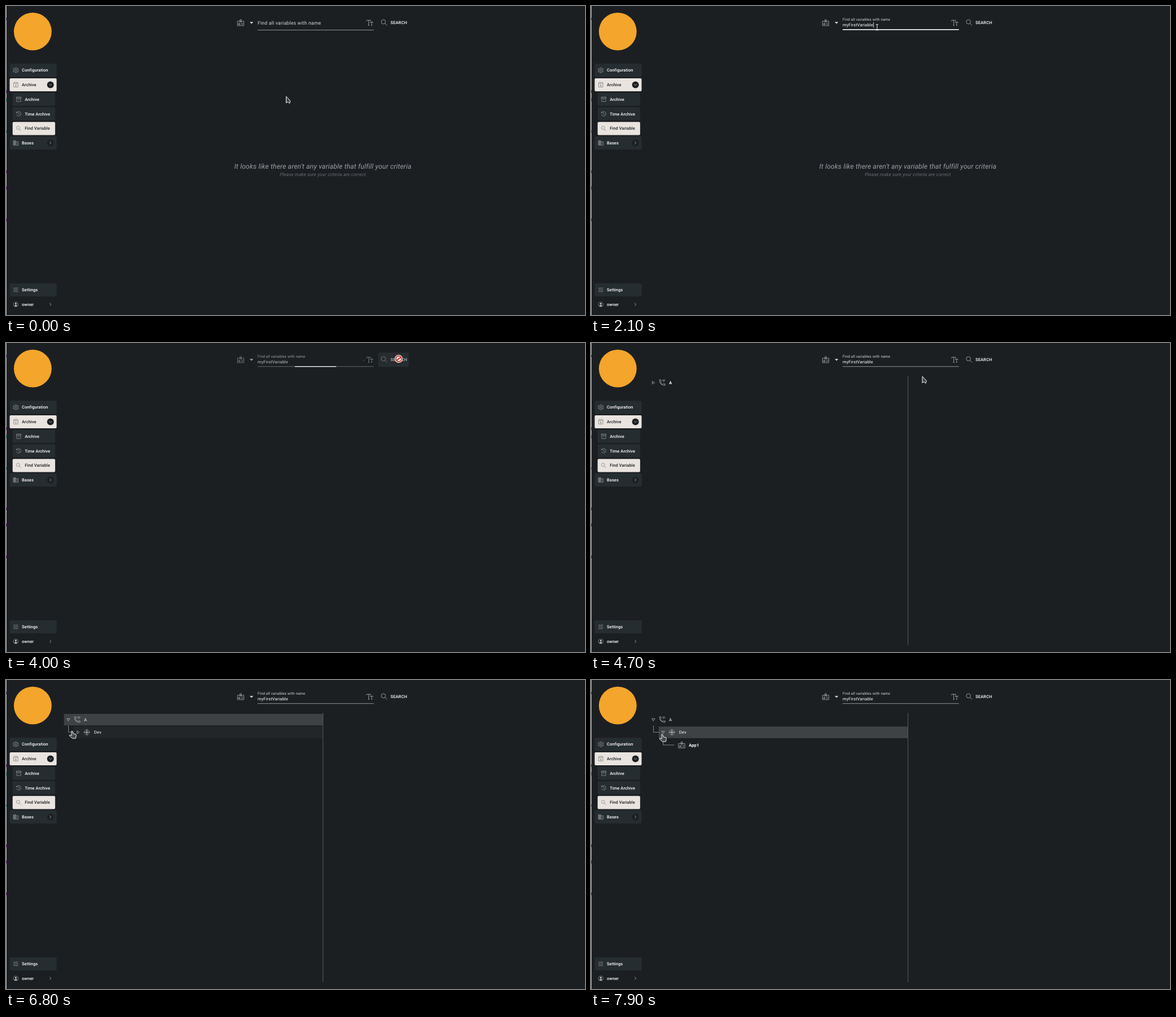
Animation of 1024x547 px, one loop 8 s. Source, as an HTML page:

```html
<!DOCTYPE html>
<html lang="en">
<head>
<meta charset="utf-8">
<title>Find variable</title>
<style>
html, body { margin: 0; width: 100%; height: 100%; overflow: hidden; background: #1c1f22; }
svg { display: block; width: 100%; height: 100%; }
text { font: 7.47px Roboto, sans-serif; letter-spacing: .133px; fill: #fff; white-space: pre; text-rendering: geometricPrecision; }
.icon { fill: none; stroke: #c4c6c7; stroke-width: .7; }
#menu text { font-weight: 500; letter-spacing: .07px; }
#menu .icon { stroke: #b4b7b8; stroke-width: .6; }
#menu .dark .icon { stroke: #606365; }
#menu .dark text { fill: #1c1f22; }
.solid { fill: #d8d9da; stroke: none; }
.link { fill: none; stroke: #8b8e90; stroke-width: .9; }
.cursor { fill: #45484a; stroke: #f4f4f4; stroke-width: 1; stroke-linejoin: round; }
</style>
</head>
<body>
<svg viewBox="0 0 1024 547" preserveAspectRatio="none">
  <defs>
    <path id="gear" d="M-1-4.3H1L1.4-3 2.7-2.4 3.8-3 4.6-1.4 3.5-.6V.6L4.6 1.4 3.8 3 2.7 2.4 1.4 3 1 4.3H-1L-1.4 3-2.7 2.4-3.8 3-4.6 1.4-3.5.6V-.6L-4.6-1.4-3.8-3-2.7-2.4-1.4-3ZM1.5 0A1.5 1.5 0 1 0-1.5 0 1.5 1.5 0 1 0 1.5 0"/>
    <path id="inbox" d="M-3.8-3.4 -3-4.3H3L3.8-3.4V4H-3.8ZM-3.8-2.4H3.8M0-1V2.5M-1.6 1 0 2.6 1.6 1"/>
    <path id="box" d="M-4.2-4H4.2V-2H-4.2ZM-3.5-2V4H3.5V-2M-1.3 0H1.3"/>
    <path id="history" d="M-3.6-2A4 4 0 1 1-3.8 1.4M-4.2-3.8-3.8-1.5-1.5-1.9M0-2.3V.3L2 1.4"/>
    <path id="lens" d="M1.8-1.1A2.9 2.9 0 1 0-4-1.1 2.9 2.9 0 1 0 1.8-1.1M1 1 4.2 4.2"/>
    <path id="building" d="M-4.2-4H0V4H-4.2ZM0-2H4.3V4H0M-4.2-2H0M-4.2 0H0M-4.2 2H0M-2.1-4V4M1.5 0H3M1.5 2H3"/>
    <path id="sliders" d="M-4.3-3H.5M2.3-3H4.3M1.4-4.2V-1.8M-4.3 0H-2.4M-.6 0H4.3M-1.5-1.2V1.2M-4.3 3H.5M2.3 3H4.3M1.4 1.8V4.2"/>
    <g id="user"><circle r="4.1"/><circle class="solid" cy="-1.1" r="1.5"/><path class="solid" d="M-2.7 2.5Q0 .2 2.7 2.5 0 4.5-2.7 2.5"/></g>
    <path id="badge" d="M-5.6-2.6H5.6V5.3H-5.6ZM-1.2-1.2V-5.3H1.2V-1.2ZM-3.8 3.3V1.8H-1V3.3ZM-2.9.2H-1.9M1.2.8H4M1.2 3H4"/>
    <path id="phone" d="M-5-4.8H-2.4L-1.9-2-3.3-.5Q-2 2 .7 3.4L2.2 1.9 5 2.5V5Q-5 5-5-4.8ZM-.2-3.8Q2.6-6 5.5-3.8M1-2.2Q2.6-3.5 4.3-2.2M2.6-.5V0"/>
    <path id="flake" d="M0-5.6V5.6M-5.6 0H5.6M-4-4 4 4M-4 4 4-4M-1.6-5 0-3.4 1.6-5M-1.6 5 0 3.4 1.6 5M-5-1.6-3.4 0-5 1.6M5-1.6 3.4 0 5 1.6"/>
    <path id="closed" d="M-1.8-2.6 2.3 0-1.8 2.6Z"/>
    <path id="open" d="M-2.6-1.8H2.6L0 2.3Z"/>
  </defs>

  <rect width="1024" height="547" fill="#1c1f22"/>
  <rect width="1" height="547" fill="#bfc1c3"/>
  <path d="M.5 21v4M.5 149v5M.5 291v5M.5 319v6M.5 376v5" stroke="#8a3fa0"/>
  <path d="M.5 163v6M.5 220v4" stroke="#379b94"/>
  <circle cx="47.3" cy="45.2" r="33.4" fill="#f4a52b"/>
  <g id="menu"></g>

  <g id="message">
    <text x="560.4" y="288" text-anchor="middle" style="font-size:12.2px;font-style:italic;fill:#9a9da2">It looks like there aren't any variable that fulfill your criteria</text>
    <text x="560.2" y="300.6" text-anchor="middle" style="font-size:8.2px;font-style:italic;fill:#696c71">Please make sure your criteria are correct</text>
  </g>

  <g id="form">
    <use href="#badge" class="icon" x="415" y="29.5"/>
    <path d="M431 28.2H437.4L434.2 31.4Z" fill="#dedede"/>
    <text id="label" style="font-size:8.53px;letter-spacing:.03125em;fill:#d8d9da">Find all variables with name</text>
    <text id="typed" x="445" y="36">myFirstVariable</text>
    <path d="M638 27.2V25.2H645V27.2M641.5 25.2V34.2M640.2 34.2H642.8M644.4 29.8V28.6H649V29.8M646.7 28.6V34.2M645.7 34.2H647.7" class="icon"/>
  </g>
  <path id="line" stroke-width=".8"/>
  <path id="focus" stroke="#fff" stroke-width="1.4"/>
  <path id="loading" stroke="#fff" stroke-width="1.2"/>
  <path id="caret" stroke="#fff" stroke-width=".8"/>
  <circle id="dot" cx="632.4" cy="30.8" r=".6" fill="#aaa"/>
  <rect id="hover" x="658.5" y="17" width="54" height="25.2" rx="2" fill="#272c2f"/>
  <circle id="ripple" cx="695" cy="29" fill="#fff" opacity=".1"/>
  <g id="search">
    <path d="M671.3 28A3.8 3.8 0 1 0 663.7 28 3.8 3.8 0 1 0 671.3 28M670.3 30.8 674 34.5" class="icon"/>
    <text x="680" y="32.1" style="font-weight:500">SEARCH</text>
  </g>

  <g id="results">
    <path d="M560.5 58V535" stroke="#56595b"/>
    <rect id="rowA" x="102.5" y="60" width="457.5" height="20.3"/>
    <rect id="rowDev" x="119.7" y="82.4" width="440.3" height="20.5"/>
    <use id="arrowA" class="icon" x="110.2" y="70.2"/>
    <use href="#phone" class="icon" x="126" y="70"/>
    <text id="nameA" x="138" y="72.9">A</text>
    <g id="dev">
      <path class="link" d="M110.5 80.5V92.5H120.5"/>
      <use id="arrowDev" class="icon" x="127.4" y="92.5"/>
      <use href="#flake" class="icon" x="143" y="92.5"/>
      <text x="155.8" y="95.3">Dev</text>
    </g>
    <g id="app">
      <path class="link" d="M127.5 103V115H147"/>
      <use id="appIcon" href="#badge" class="icon" x="160.4" y="115"/>
      <text x="173" y="117.9" style="font-weight:700">App1</text>
    </g>
  </g>

  <g id="pointer">
    <path id="arrow" class="cursor" d="M0 0 7.4 8 6 12.4 2.9 9.8 0 11.6Z"/>
    <path id="beam" fill="none" stroke="#e8e8e8" d="M-2.2-5H2.2M0-5V5M-2.2 5H2.2"/>
    <path id="hand" class="cursor" d="M-.8.8Q.2-.4 1.2.8L2.3 5 6.4 5.8Q8 6.3 7.6 8.5L6.6 13.3H.8L-4.4 8.6Q-4.8 7 -3 7.2L-.3 8.4Z"/>
    <g id="blocked">
      <circle r="7" fill="#fff"/>
      <path d="M5 0A5 5 0 1 0-5 0 5 5 0 1 0 5 0M-3.6 2.6 3.6-2.6" fill="none" stroke="#c9372c" stroke-width="2"/>
    </g>
  </g>
</svg>
<script>
const LOOP = 8000, STEP = 100;
const $ = id => document.getElementById(id);
const show = (id, on) => $(id).style.display = on ? '' : 'none';
const set = (id, attrs) => { for (const key in attrs) $(id).setAttribute(key, attrs[key]); };
const ramp = (t, from, to) => Math.min(1, Math.max(0, (t - from) / (to - from)));
const mix = (a, b, k) => a + (b - a) * k;

// label, icon, centre y, indent, background, chevron
const LIGHT = '#e9e4df', PLAIN = '#262d30';
const menu = [
  ['Configuration', 'gear', 113.8, 0, PLAIN],
  ['Archive', 'inbox', 139.5, 0, LIGHT, 'down'],
  ['Archive', 'box', 165.2, 5.2, PLAIN],
  ['Time Archive', 'history', 190.9, 5.2, PLAIN],
  ['Find Variable', 'lens', 216.8, 5.2, LIGHT],
  ['Bases', 'building', 242.4, 0, PLAIN, 'right'],
  ['Settings', 'sliders', 502.5, 0, PLAIN],
  ['owner', 'user', 528.2, 0, 'none', 'right']
];
$('menu').innerHTML = menu.map(([label, icon, y, indent, fill, chevron]) => `
  <g class="${fill === LIGHT ? 'dark' : ''}" transform="translate(0 ${y})">
    <rect x="${6.5 + indent}" y="-11.6" width="${83 - indent * 1.5}" height="23.2" rx="2" fill="${fill}"/>
    <use href="#${icon}" class="icon" x="${17.3 + indent}"/>
    <text x="${28 + indent}" y="2.6">${label}</text>
    ${chevron ? `<circle cx="78.6" r="6" fill="#1c1f22"/>
    <path d="M-1.2-2.4 1.2 0-1.2 2.4" transform="translate(78.6) rotate(${chevron === 'down' ? 90 : 0})"
      fill="none" stroke="#c0c2c3" stroke-width=".8"/>` : ''}
  </g>`).join('');

// time, hotspot x, hotspot y, shape
const path = [
  [0, 495.5, 160, 'arrow'], [600, 495.5, 160, 'arrow'], [900, 502, 98, 'arrow'],
  [1100, 506.5, 49, 'arrow'], [1300, 506, 39, 'beam'], [1400, 506, 37.8, 'beam'],
  [2700, 506, 37.8, 'beam'], [2800, 530, 45, 'arrow'], [2900, 577, 50, 'arrow'],
  [3000, 628, 50, 'arrow'], [3100, 664, 43, 'arrow'], [3200, 686, 32, 'hand'],
  [3300, 694.5, 28, 'hand'], [3800, 694.5, 28, 'blocked'], [4300, 694.5, 28, 'hand'],
  [4500, 694.5, 28, 'hand'], [4600, 672, 40, 'arrow'], [4800, 500, 78, 'arrow'],
  [5000, 270, 97, 'arrow'], [5200, 115, 79, 'arrow'], [5300, 87.5, 71, 'arrow'],
  [5400, 86.5, 71, 'arrow'], [5600, 99, 69, 'arrow'], [5700, 106, 68, 'hand'],
  [5900, 108.5, 67.5, 'hand'], [6400, 108.5, 67.5, 'hand'], [6600, 111, 78, 'hand'],
  [6800, 116.5, 90, 'hand'], [6900, 121, 94, 'hand'], [7200, 125.6, 95.8, 'hand'],
  [8000, 125.6, 95.8, 'hand']
];

function drawPointer(t) {
  const i = path.findLastIndex(p => p[0] <= t);
  const [t0, x0, y0, shape] = path[i];
  const [t1, x1, y1] = path[i + 1] || path[i];
  const k = t1 > t0 ? (t - t0) / (t1 - t0) : 0;
  set('pointer', { transform: `translate(${mix(x0, x1, k)} ${mix(y0, y1, k)})` });
  for (const id of ['arrow', 'beam', 'hand', 'blocked']) show(id, id === shape);
  return shape;
}

function drawForm(t, shape) {
  const busy = t >= 3800 && t < 4300;
  const float = ramp(t, 1500, 1800);
  set('label', { transform: `translate(445 ${mix(32.7, 26.4, float)}) scale(${mix(1, .75, float)})` });
  show('typed', t >= 2100);
  set('form', { opacity: busy ? .7 : 1 });
  set('search', { opacity: busy ? .65 : 1 });
  set('line', {
    d: `M445 ${mix(42.6, 41.7, float)}H650.5`,
    stroke: busy ? '#77797b' : shape === 'beam' ? '#f4f4f4' : '#b0b2b3'
  });

  const half = 102.75 * float;
  set('focus', { d: `M${547.75 - half} 41.7H${547.75 + half}` });
  show('focus', t >= 1600 && t < 3700);
  const x = t >= 2100 ? 499.6 : 445.4;
  set('caret', { d: `M${x} 28.8V38.2` });
  show('caret', t >= 1600 && t < 3700 && !(t >= 2800 && t < 3300));

  const start = 511 + (t - 4000) * .3;
  set('loading', { d: `M${Math.max(445, start)} 41.6H${Math.min(650.5, start + 73)}` });
  show('loading', busy);
  show('dot', busy);
  show('hover', t >= 3200 && t < 4600);
  set('ripple', { r: 18 * ramp(t, 3600, 3900) });
  show('ripple', t >= 3700 && t < 3900);
}

function drawTree(t) {
  const devClick = ramp(t, 7400, 7700);
  show('message', t < 3800);
  show('results', t >= 4300);
  set('rowA', { fill: '#3e4245', opacity: (.2 * ramp(t, 5500, 5700) + .8 * ramp(t, 5800, 6200)) * (1 - devClick) });
  set('rowDev', { fill: '#3e4245', opacity: .2 * ramp(t, 6500, 6800) + .8 * devClick });
  $('nameA').style.fontWeight = t < 5900 ? 700 : 400;
  set('arrowA', { href: t < 6100 ? '#closed' : '#open' });
  set('arrowDev', { href: t < 7900 ? '#closed' : '#open' });
  show('dev', t >= 6100);
  show('app', t >= 7800);
  show('appIcon', t >= 7900);
}

function render(now) {
  const t = Math.floor(now % LOOP / STEP) * STEP;
  drawForm(t, drawPointer(t));
  drawTree(t);
}

const begin = performance.now();
function tick() {
  render(performance.now() - begin);
  requestAnimationFrame(tick);
}
tick();
</script>
</body>
</html>
```
